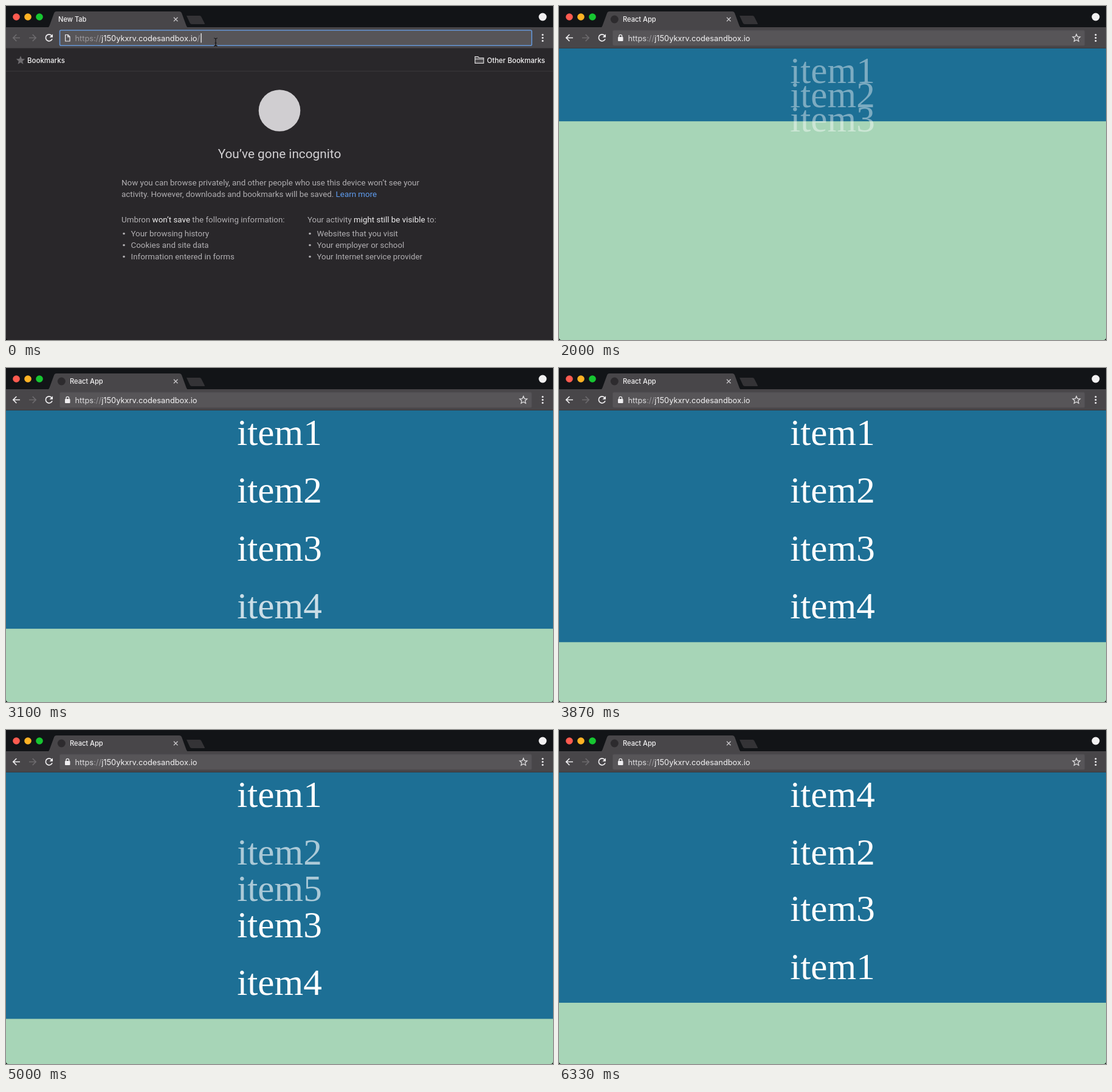
Write an HTML page that moves like this. It is 900 by 551 pixels and loops after 6.36 s.

```html
<!DOCTYPE html>
<html lang="en">
<head>
<meta charset="utf-8">
<title>Animated list</title>
<style>
  html, body { margin: 0; width: 100%; height: 100%; overflow: hidden; background: #29272a; }
  svg { display: block; width: 900px; height: 551px; }
  text { white-space: pre; }
  .ui { font: 500 11.1px Inter, "Open Sans", sans-serif; fill: #f4f3f4; }
  .mark { font-size: 11.5px; }
  .url { font: 400 12.85px Inter, "Open Sans", sans-serif; fill: #f4f3f4; }
  .page { font: 400 13.36px Roboto, "Open Sans", sans-serif; fill: #b1afb2; }
  .page .head { font-size: 20.8px; fill: #d2d0d3; }
  .page .strong { fill: #efeeef; }
  .page .link { fill: #5f9df0; }
  .dim { fill: #9b999c; }
  .item { font: 61.3px "Liberation Serif", Times, serif; fill: #fff; text-anchor: middle; }
  .line { fill: none; stroke-width: 1.7; }
</style>
</head>
<body>
<svg viewBox="0 0 900 551">
  <defs>
    <linearGradient id="fade" gradientUnits="userSpaceOnUse" x1="254" x2="271" y1="0" y2="0">
      <stop offset="0" stop-color="#f4f3f4"/>
      <stop offset="1" stop-color="#f4f3f4" stop-opacity="0"/>
    </linearGradient>
  </defs>

  <rect width="900" height="551" fill="#29272a"/>

  <g id="app">
    <rect y="70" width="900" height="481" fill="#a7d5b7"/>
    <rect id="list" y="70" width="900" fill="#1d6f95"/>
    <g id="items"></g>
  </g>

  <g id="start" class="page">
    <rect y="107" width="900" height="1" fill="#39373a"/>
    <path d="M24 82.2l2 4.9 5.2.4-4 3.4 1.3 5.1-4.5-2.8-4.5 2.8 1.3-5.1-4-3.4 5.2-.4z" fill="#6d6b6e"/>
    <text class="ui mark" x="35" y="93.7">Bookmarks</text>
    <path d="M771.7 94.3V83.7h5l1.5 1.8h7.6v8.8zM771.7 87.5h14" fill="#4b494c" stroke="#dddcdd" stroke-width="1.2"/>
    <text class="ui mark" x="887" y="93.7" text-anchor="end">Other Bookmarks</text>
    <circle cx="450" cy="172.5" r="34.3" fill="#d0ced1"/>
    <text class="head" x="450" y="251" text-anchor="middle">You’ve gone incognito</text>
    <text x="190" y="295.5">Now you can browse privately, and other people who use this device won’t see your</text>
    <text x="190" y="314.5">activity. However, downloads and bookmarks will be saved. <tspan class="link">Learn more</tspan></text>
    <text x="190" y="356.5">Umbron <tspan class="strong">won’t save</tspan> the following information:</text>
    <text x="496" y="356.5">Your activity <tspan class="strong">might still be visible</tspan> to:</text>
  </g>

  <rect width="900" height="36" fill="#121417"/>
  <path d="M297 16h21.500q2 0 2.800 1.800l5.700 11.200q.4 1-1 1h-20.500q-2 0-2.800-1.800z" fill="#343336"/>
  <path d="M68 36q2.500-.5 3.500-3.500l7.500-20.500q1-3 4-3h202q3 0 4.200 3l7.500 20.500q1 3 3.500 3.500z" fill="#484649"/>
  <rect y="35" width="900" height="35" fill="#484649"/>
  <rect y="69" width="900" height="1" fill="#3b393c"/>
  <circle cx="17" cy="18" r="5.800" fill="#ff5b50"/>
  <circle cx="36" cy="18" r="5.800" fill="#fdb224"/>
  <circle cx="55" cy="18" r="5.800" fill="#17c631"/>
  <circle cx="883" cy="18" r="6.500" fill="#f1f0f1"/>
  <path d="M276 18.700l6.500 6.500m0-6.500l-6.500 6.500" class="line" stroke="#c9c7ca" style="stroke-width:1.300"/>

  <path id="back" class="line" d="M23 52.500H12M17.300 47l-5.500 5.500 5.500 5.500"/>
  <path class="line" stroke="#6d6b6e" d="M38 52.500h11M43.700 47l5.500 5.500-5.500 5.500"/>
  <path class="line" stroke="#efeef0" d="M75.200 49a5.500 5.500 0 1 0 .8 5.200"/>
  <path d="M77 46.200v5.500h-5.500z" fill="#efeef0"/>
  <g fill="#efeef0">
    <circle cx="883" cy="47.500" r="1.500"/>
    <circle cx="883" cy="52.500" r="1.500"/>
    <circle cx="883" cy="57.500" r="1.500"/>
  </g>

  <rect id="field" x="88.500" y="40" width="776.500" height="25.300" rx="2" fill="#575558"/>
  <path id="paper" d="M97.700 47.500h4.300l3 3v7.500h-7.300zM101.700 47.500v3.300h3.300" fill="none" stroke="#efeef0" stroke-width="1.200"/>
  <g id="secure">
    <rect x="97" y="51" width="8.500" height="7" rx="1" fill="#efeef0"/>
    <path d="M98.900 51v-1.300a2.350 2.350 0 0 1 4.700 0v1.300" fill="none" stroke="#efeef0" stroke-width="1.300"/>
    <path d="M851.300 46.600l1.700 4 4.400.4-3.300 2.900 1 4.300-3.800-2.300-3.800 2.300 1-4.300-3.300-2.900 4.400-.4z" fill="none" stroke="#dedddf" stroke-width="1.300"/>
    <circle cx="91.300" cy="22" r="6.500" fill="#2d2b2e"/>
    <text class="url" x="113.500" y="57.500"><tspan fill="#dedddf">https</tspan><tspan class="dim">://</tspan>j150ykxrv.codesandbox.io</text>
  </g>
  <g id="typed">
    <text class="url" x="113.500" y="57.500"><tspan class="dim">https://</tspan>j150ykxrv.codesandbox.io<tspan class="dim">/</tspan></text>
    <g id="cursor">
      <rect x="320.500" y="45" width="1.200" height="15.500" fill="#fff"/>
      <path d="M342 53q3 0 3 2 0-2 3-2M345 55v9M342 66q3 0 3-2 0 2 3 2M343.500 61h3" fill="none" stroke="#151416" stroke-width="1.200"/>
    </g>
  </g>

  <text id="tabNew" class="ui" x="86" y="25.700">New Tab</text>
  <text id="tabUrl" class="ui" x="105" y="25.700" style="fill:url(#fade)">https://j150ykxrv.codesandbox.io</text>
  <text id="tabApp" class="ui" x="105" y="25.700">React App</text>

  <path d="M0 547v4h4q-4 0-4-4zM900 547v4h-4q4 0 4-4z" fill="#000"/>
</svg>

<script>
const LOOP = 6360, TICK = 100 / 3;
const ENTER = 670, COMMIT = 1330, MOUNT = 1890, SHUFFLE = 5900;
const TOP = 70.3, ROW = 95.5, BASELINE = 56.3;

// Times at which each item is added, removed, added again, ...
const toggles = {
  1: [MOUNT],
  2: [MOUNT, 4900, SHUFFLE],
  3: [MOUNT],
  4: [2885],
  5: [3895, 4900]
};

const $ = id => document.getElementById(id);

function make(tag, attrs, parent, text = '') {
  const el = document.createElementNS('http://www.w3.org/2000/svg', tag);
  for (const key in attrs) el.setAttribute(key, attrs[key]);
  el.textContent = text;
  return parent.appendChild(el);
}

function bullets(x, lines) {
  lines.forEach((line, i) => {
    const y = 379.5 + i * 19;
    make('circle', { cx: x + 4, cy: y - 4, r: 1.8, fill: '#b1afb2' }, $('start'));
    make('text', { x: x + 15.5, y }, $('start'), line);
  });
}
bullets(190, ['Your browsing history', 'Cookies and site data', 'Information entered in forms']);
bullets(496, ['Websites that you visit', 'Your employer or school', 'Your Internet service provider']);

const labels = {};
for (const n in toggles) labels[n] = make('text', { class: 'item', x: 450 }, $('items'), 'item' + n);

// Critically damped spring from 0 to 1
function spring(ms) {
  const u = 13 * ms / 1000;
  return 1 - (1 + u) * Math.exp(-u);
}

function presence(n, t) {
  const past = toggles[n].filter(at => at <= t);
  if (!past.length) return 0;
  const s = spring(t - past[past.length - 1]);
  return past.length % 2 ? s : 1 - s;
}

function show(id, on) {
  $(id).style.display = on ? '' : 'none';
}

function drawList(t) {
  const order = t < SHUFFLE ? [1, 2, 5, 3, 4] : [4, 2, 3, 1];
  let y = TOP;
  for (const n in labels) labels[n].setAttribute('opacity', 0);
  for (const n of order) {
    const amount = presence(n, t);
    labels[n].setAttribute('y', y + BASELINE);
    labels[n].setAttribute('opacity', amount);
    y += ROW * amount;
  }
  $('list').setAttribute('height', y - 70);
}

function draw(t) {
  const loaded = t >= COMMIT, mounted = t >= MOUNT, focused = t < ENTER;
  show('start', !loaded);
  show('paper', !loaded);
  show('typed', !loaded);
  show('tabNew', !loaded);
  show('secure', loaded);
  show('tabUrl', loaded && !mounted);
  show('tabApp', mounted);
  show('app', mounted);
  show('cursor', focused);
  $('back').setAttribute('stroke', loaded ? '#efeef0' : '#6d6b6e');
  $('field').setAttribute('stroke', focused ? '#6596d6' : '#4f4d50');
  $('field').setAttribute('stroke-width', focused ? 1.6 : 1);
  if (mounted) drawList(t);
}

const begin = performance.now();
function frame() {
  const t = (performance.now() - begin) % LOOP;
  const k = Math.floor((t + 3.4) / TICK);
  draw(Math.round(k * TICK / 10) * 10);
  requestAnimationFrame(frame);
}
frame();
</script>
</body>
</html>
```
